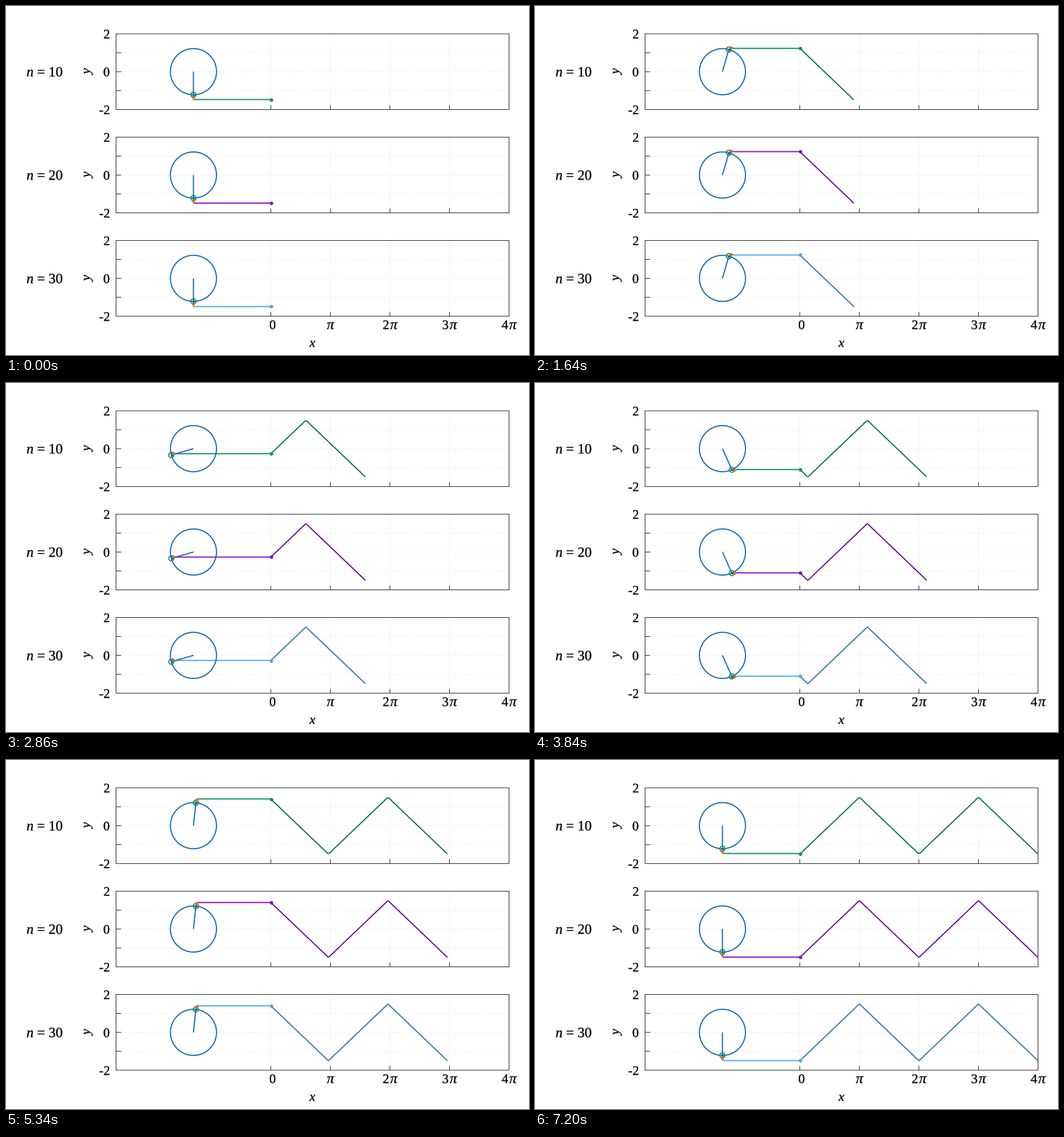
These frames come from a looping animation (720 by 480 pixels, 7.22 s). A matplotlib script:

```python
import numpy as np
import matplotlib.pyplot as plt
from matplotlib.animation import FuncAnimation
from matplotlib.collections import LineCollection
from matplotlib.patches import PathPatch
from matplotlib.textpath import TextPath
from matplotlib.transforms import Affine2D

plt.rcParams["path.snap"] = False  # keep thin lines at their exact positions

W, H, DPI = 720, 480, 100
PX = 72 / DPI
FRAMES = 361
LEFT, RIGHT = 151.5, 692.5
PI_STEP = (RIGHT - LEFT) / 6.6
X0 = LEFT + 2.6 * PI_STEP
HUB = X0 - 1.3 * PI_STEP
XS, YS = PI_STEP / np.pi, 26.05
ARM_COLORS = ["#0b64ae", "#129068", "#e0601e", "#e69f00", "#e51e10", "#e69f00"]
INK = "#333333"

# terms, centre row, bright colour, curve colour
PANELS = [
    (10, 90.3, "#0c9067", "#006a4c"),
    (20, 232.45, "#9009cc", "#5c0292"),
    (30, 374.6, "#4da7e2", "#2f729f"),
]

fig = plt.figure(figsize=(W / DPI, H / DPI), dpi=DPI, facecolor="white")
ax = fig.add_axes([0, 0, 1, 1])
ax.set_xlim(0, W)
ax.set_ylim(H, 0)
ax.axis("off")


def label(x, y, s, size=18, italic=False, align=0.5, turned=False):
    """Text outline; align 0, 0.5, 1 puts its left, middle or right edge at x."""
    font = {"family": "Liberation Serif", "style": "italic" if italic else "normal"}
    path = TextPath((0, 0), s, size=size, prop=font)
    box = path.get_extents()
    if turned:
        move = Affine2D().translate(-(box.x0 + box.x1) / 2, -(box.y0 + box.y1) / 2)
        move.rotate_deg(90)
    else:
        move = Affine2D().translate(-box.x0 - align * box.width, 0)
    move.scale(1, -1).translate(x, y)
    ax.add_patch(PathPatch(move.transform_path(path), fc="black", ec="black",
                           lw=0.3 * PX, zorder=8))


def segments(segs, color, width, z, **kw):
    ax.add_collection(LineCollection(segs, colors=color, linewidths=width * PX,
                                     zorder=z, **kw))


def draw_frame(n, mid):
    top, bottom = mid - 2 * YS, mid + 2 * YS
    rows = [mid + k * YS for k in (-1, 0, 1)]
    cols = [X0 + k * PI_STEP for k in range(4)]
    grid = [[(LEFT, r), (RIGHT, r)] for r in rows]
    grid += [[(c, top), (c, bottom)] for c in cols]
    segments(grid, "#dde3dd", 0.9, 1, linestyles=[(0, (1.2, 2.6))])
    ticks = [[(LEFT, r), (LEFT + 7, r)] for r in rows]
    ticks += [[(c, bottom), (c, bottom - 6)] for c in cols]
    segments(ticks, INK, 0.9, 2)
    box = [(LEFT, top), (RIGHT, top), (RIGHT, bottom), (LEFT, bottom), (LEFT, top)]
    segments([box], INK, 0.9, 7)

    for v in (2, 0, -2):
        label(142.2, mid - v * YS + 6.4, str(v), align=1)
    label(113.4, mid, "y", 18, True, turned=True)
    label(28.9, mid + 6.6, "n", 19.5, True, align=0)
    label(43.7, mid + 6.6, f"= {n}", 19.5, align=0)


class Panel:
    def __init__(self, n, mid, bright, dark):
        self.mid = mid
        self.odd = 2 * np.arange(1, n + 1) - 1
        self.amp = 12 / np.pi**2 / self.odd**2
        draw_frame(n, mid)
        style = dict(solid_capstyle="butt", solid_joinstyle="round")
        self.wave, = ax.plot([], [], color=dark, lw=1.5 * PX, zorder=3, **style)
        self.link, = ax.plot([], [], color=bright, lw=1.6 * PX, zorder=4, **style)
        self.arms = LineCollection([], linewidths=1.5 * PX, zorder=5,
                                   colors=np.repeat(ARM_COLORS, 2))
        ax.add_collection(self.arms)
        self.joint, = ax.plot([], [], "o", color=ARM_COLORS[0], ms=3.2 * PX, mew=0,
                              zorder=5)
        self.dot, = ax.plot([], [], "o", color=bright, ms=4.8 * PX, mew=0, zorder=6)

    def height(self, t):
        return -np.cos(np.outer(t, self.odd)) @ self.amp

    def update(self, i):
        t = np.radians(2 * i)
        x = HUB + XS * np.r_[0, np.cumsum(self.amp * np.sin(self.odd * t))]
        y = self.mid + YS * np.r_[0, np.cumsum(self.amp * np.cos(self.odd * t))]
        turn = np.linspace(0, 2 * np.pi, 73)
        segs = []
        for k in range(len(ARM_COLORS)):
            r = self.amp[k] * XS
            segs.append(np.c_[x[k] + r * np.cos(turn), y[k] + r * np.sin(turn)])
            segs.append(np.c_[x[k:k + 2], y[k:k + 2]])
        self.arms.set_segments(segs)
        self.joint.set_data([x[1]], [y[1]])
        self.link.set_data([x[-1], X0], [y[-1], y[-1]])
        self.dot.set_data([X0], [y[-1]])
        s = np.radians(2 * np.arange(i + 1))
        self.wave.set_data(X0 + XS * s, self.mid - YS * self.height(t - s))


panels = [Panel(*p) for p in PANELS]

BASE = 444.3
label(367, BASE, "0")
label(X0 + PI_STEP + 0.4, BASE, "π", 20, True)
for k in (2, 3, 4):
    x = X0 + k * PI_STEP
    label(x - 5.6, BASE, str(k))
    label(x + 5.6, BASE, "π", 20, True)
label(421.6, 468.8, "x", 18, True)


def update(i):
    for p in panels:
        p.update(i)
    return []


anim = FuncAnimation(fig, update, frames=FRAMES, interval=20, repeat=True,
                     repeat_delay=0, blit=False)
plt.show()
```
